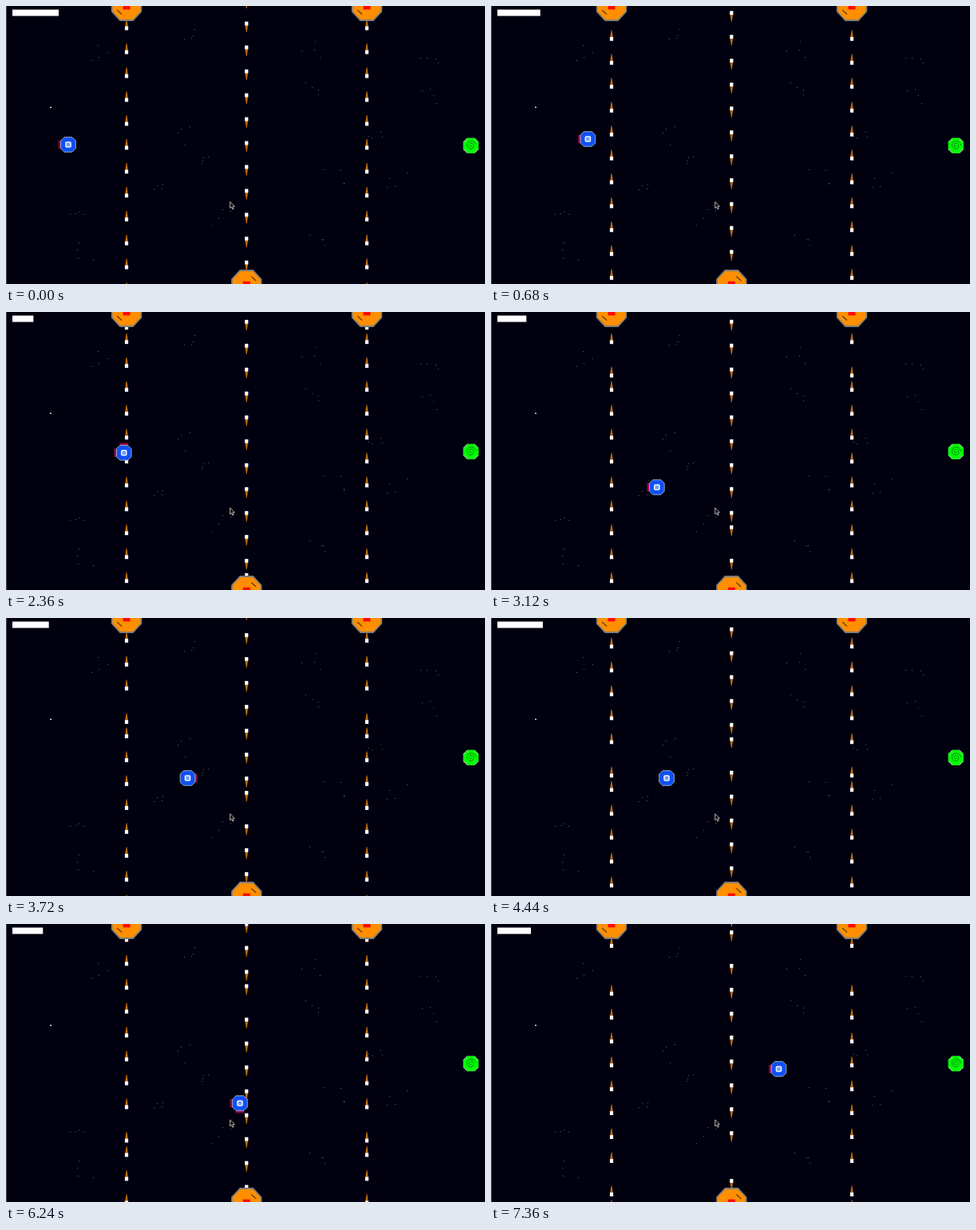
An HTML page that plays this animation: 600x349 px, repeating every 7400 ms.

```html
<!DOCTYPE html>
<html lang="en">
<head>
<meta charset="utf-8">
<title>Space dodge</title>
<style>
  html, body { margin: 0; width: 100%; height: 100%; overflow: hidden; background: #00000f; }
  svg { display: block; width: 100vw; height: 100vh; }
</style>
</head>
<body>
<svg viewBox="0 0 600 349" xmlns="http://www.w3.org/2000/svg">
  <defs>
    <g id="bullet">
      <path d="M-.4-11H.4L1.8-2H-1.8Z" fill="#c06c0e"/>
      <rect x="-2.1" y="-2.4" width="4.2" height="4.8" fill="#fff"/>
    </g>
    <g id="turret">
      <path d="M-8-20H8L18.3-9V7L8 18H-8L-18.3 7V-9Z" fill="#ff8f00" stroke="#7d7d78" stroke-width="1.8"/>
      <rect x="-4.5" y="-5" width="9" height="9.3" fill="#fa0a0a"/>
      <path d="M-12 5l6 5.5" stroke="#643c0c" stroke-width="1.2"/>
    </g>
    <g id="thruster">
      <rect x="-12.5" y="-5.5" width="2" height="11" fill="#7a0638"/>
      <rect x="-10.5" y="-5" width="1.3" height="10" fill="#e0107c"/>
    </g>
  </defs>
  <rect width="600" height="349" fill="#00000f"/>
  <rect width="1" height="349" fill="#4a4a52"/>
  <g id="stars" fill="#5a5f62"></g>
  <rect x="55" y="126.5" width="2" height="1.5" fill="#d8d8d8"/>
  <g id="bullets"></g>
  <use href="#turret" x="151"/>
  <use href="#turret" x="452"/>
  <use href="#turret" transform="translate(301.3 350) rotate(180)"/>
  <g transform="translate(582.3 175.2)">
    <path d="M-5-9.5H5L9.5-5V5L5 9.5H-5L-9.5 5V-5Z" fill="#9fb89f"/>
    <path d="M-5-9.5H5V-7H7V-5H9.5V5H7V7H5V9.5H-5V7H-7V5H-9.5V-5H-7V-7H-5Z" fill="#0f0"/>
    <path id="spiral" fill="none" stroke="#067a12"/>
  </g>
  <g id="ship">
    <g id="thrusters"></g>
    <path d="M-5-9.3H5L9.3-5V5L5 9.3H-5L-9.3 5V-5Z" fill="#0f50f5" stroke="#98a6ba" stroke-width="1"/>
    <rect x="-3" y="-3" width="6" height="6" rx="1" fill="#6f9cf5" stroke="#eef4ff" stroke-width="1.6"/>
  </g>
  <rect id="bar" x="8" y="4.5" height="8" fill="#fff"/>
  <path d="M280.7 245.8v8l1.8-1.6 1.4 3 1.3-.6-1.3-2.9h2.4Z" fill="#000" stroke="#ddd" stroke-width=".8"/>
</svg>
<script>
const LOOP = 7400, STEP = 40, GAP = 30;
const SLOW = 0.0157, FULL = 58, DRAIN = 0.0163, CHARGE = 0.0156;
const $ = id => document.getElementById(id);

function add(parent, tag, attrs) {
  const node = document.createElementNS('http://www.w3.org/2000/svg', tag);
  for (const name in attrs) node.setAttribute(name, attrs[name]);
  return parent.appendChild(node);
}

// Slow motion alternates with normal play: end in ms, speed in px per ms
const phases = [[420, 0.0935], [2420, SLOW], [3720, 0.0845], [5030, 0.0935], [6670, SLOW], [LOOP, 0.088]];

// Keys held, each for a length of game distance
const course = 'R30 RU7 R23 RD53 R27 RU19 -12 L17 -61 R37 RD30 RU49 R40'
  .split(' ').map(leg => ({ keys: leg.replace(/\d/g, ''), length: +leg.match(/\d+/) }));
const keyNames = ['R', 'D', 'L', 'U'];

// Energy drains in slow motion and recharges otherwise
function gameState(time) {
  let distance = 0, energy = FULL, from = 0;
  for (const [end, speed] of phases) {
    const span = Math.max(0, Math.min(time, end) - from);
    distance += span * speed;
    energy = Math.min(FULL, energy + span * (speed === SLOW ? -DRAIN : CHARGE));
    from = end;
  }
  return { distance, energy };
}

function shipState(distance) {
  let x = 78, y = 174, keys = '';
  for (const leg of course) {
    if (distance <= 0 && keys) break;
    keys = leg.keys;
    const d = Math.min(distance, leg.length), held = key => keys.includes(key);
    x += d * (held('R') - held('L'));
    y += d * (held('D') - held('U'));
    distance -= leg.length;
  }
  return { x, y, keys };
}

// Stars scattered around a few cluster centres
let seed = 7;
function random() {
  seed = (seed * 16807) % 2147483647;
  return seed / 2147483647;
}
const clusters = [[121, 57], [227, 36], [381, 56], [379, 100], [529, 70], [533, 112], [219, 163],
  [250, 196], [185, 225], [85, 264], [101, 308], [267, 264], [412, 212], [392, 300], [491, 216], [467, 153]];
for (const [x, y] of clusters)
  for (let i = 0; i < 4; i++)
    add($('stars'), 'rect', {
      x: Math.round(x + (random() - 0.5) * 28), y: Math.round(y + (random() - 0.5) * 26), width: 1, height: 1
    });

const spiral = Array.from({ length: 40 }, (_, i) => {
  const angle = i * 0.32, radius = 0.8 + i * 0.14;
  return `${radius * Math.cos(angle)} ${radius * Math.sin(angle)}`;
});
$('spiral').setAttribute('d', 'M' + spiral.join('L'));

// Steady fire, except one early shot and one skipped
const shots = [];
for (let k = -14; k <= 11; k++) {
  if (k === -12) continue;
  const start = 28 + GAP * k + (k === -3 ? 12 : 0);
  const nodes = [151, 452, 301.3].map(x => ({ x, node: add($('bullets'), 'use', { href: '#bullet' }) }));
  shots.push({ start, nodes });
}

const thrusters = keyNames.map((_, i) =>
  add($('thrusters'), 'use', { href: '#thruster', transform: `rotate(${i * 90})` }));

function draw(time) {
  const { distance, energy } = gameState(time);
  for (const { start, nodes } of shots) {
    const y = start + distance;
    nodes.forEach(({ x, node }, i) => node.setAttribute('transform',
      i < 2 ? `translate(${x} ${y})` : `translate(${x} ${350 - y}) scale(1 -1)`));
  }
  const ship = shipState(distance);
  $('ship').setAttribute('transform', `translate(${ship.x} ${ship.y})`);
  keyNames.forEach((key, i) =>
    thrusters[i].setAttribute('visibility', ship.keys.includes(key) ? 'visible' : 'hidden'));
  $('bar').setAttribute('width', energy);
}

const begin = performance.now();
function tick() {
  const time = (performance.now() - begin) % LOOP;
  draw(Math.floor(time / STEP) * STEP);
  requestAnimationFrame(tick);
}
tick();
</script>
</body>
</html>
```
